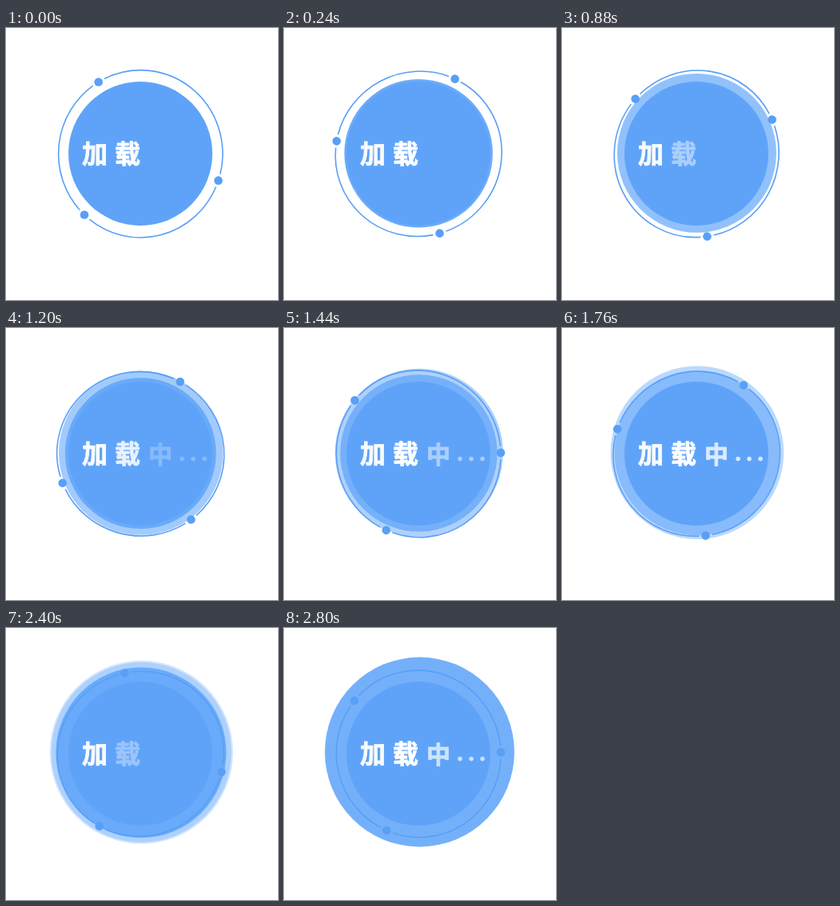
An HTML page that plays this animation: 340 by 340 pixels, repeating every 2880 ms.

```html
<!DOCTYPE html>
<html lang="zh-CN">
<head>
<meta charset="utf-8">
<title>加载中</title>
<style>
  html, body { margin: 0; width: 100%; height: 100%; overflow: hidden; background: #fff; }
  svg { display: block; width: 100vw; height: 100vh; }
  text {
    font: 900 32px "Noto Sans CJK SC", "Noto Sans CJK", sans-serif;
    text-anchor: middle;
    fill: #fff;
    stroke: #fff;
    stroke-width: .8;
    stroke-linejoin: round;
  }
</style>
</head>
<body>
<svg viewBox="0 0 340 340">
  <g id="waves" fill="#60a5fa"></g>
  <circle cx="168" cy="157" r="90" fill="#5fa3f9"/>
  <g id="orbit" fill="#599ff6"></g>
  <text x="111" y="169" opacity=".96">加</text>
  <text id="second" x="152" y="169">载</text>
  <g id="rest">
    <text x="193" y="169" style="font-size:30px">中</text>
    <text x="220 234 248" y="166" style="font-size:25px">...</text>
  </g>
</svg>
<script>
const LOOP = 2880, STEP = 80, LAST = LOOP - STEP;
const CX = 168.2, CY = 157.3, RX = 102.6, RY = 104.6;
const BASE = 90, GROWTH = 28.4;
const $ = id => document.getElementById(id);
const ramp = (t, from, span) => Math.min(1, Math.max(0, (t - from) / span));

function add(parent, tag, attrs) {
  const el = document.createElementNS("http://www.w3.org/2000/svg", tag);
  for (const k in attrs) el.setAttribute(k, attrs[k]);
  return parent.appendChild(el);
}

// The orbit is a slightly tall ellipse that turns as a whole.
function onOrbit(deg) {
  const a = deg * Math.PI / 180;
  return [CX + RX * Math.cos(a), CY + RY * Math.sin(a)];
}

const dots = [18.6, 133.2, 239.2], GAP = 4.6;
dots.forEach((deg, i) => {
  const next = i < 2 ? dots[i + 1] : dots[0] + 360;
  const [cx, cy] = onOrbit(deg);
  add($("orbit"), "circle", { cx, cy, r: 5.3 });
  add($("orbit"), "path", {
    d: `M${onOrbit(deg + GAP)} A${RX} ${RY} 0 0 1 ${onOrbit(next - GAP)}`,
    fill: "none", stroke: "#599ff6", "stroke-width": 1.6
  });
});

// Three waves start evenly apart and reach full size together.
const waves = [2000, 1300, 3000].map((fade, i) => ({
  fade, start: i * 940, el: add($("waves"), "circle", {})
}));

function drawWave({ el, start, fade }, t) {
  const age = Math.max(0, t - start);
  const grow = (age / (LAST - start)) ** .95;
  el.setAttribute("cx", 168 + 1.5 * grow);
  el.setAttribute("cy", 157 - 2 * grow);
  el.setAttribute("r", BASE + GROWTH * grow);
  el.setAttribute("opacity", age ? Math.exp(-((age / fade) ** 1.2)) : 0);
}

// Two turns per loop, lagging behind an even pace in the middle.
function turn(t) {
  const lag = Math.sin(Math.PI * ramp(t, 0, 2400) ** 1.1);
  return 720 * t / LOOP - 20.3 * Math.max(0, lag) ** 1.2;
}

// The words fade in one after another: a slow run, then a quick one.
function typing(t) {
  if (t < 480) return [1, 0];
  const [start, pace] = t < 2200 ? [480, 840] : [2260, 380];
  return [ramp(t, start, pace), .8 * ramp(t, start + .55 * pace, pace)];
}

function draw(t) {
  for (const w of waves) drawWave(w, t);
  $("orbit").setAttribute("transform", `rotate(${turn(t)} ${CX} ${CY})`);
  const [second, rest] = typing(t);
  $("second").setAttribute("opacity", second);
  $("rest").setAttribute("opacity", rest);
}

const begin = performance.now();
function tick() {
  const t = (performance.now() - begin) % LOOP;
  draw(Math.floor(t / STEP) * STEP);
  requestAnimationFrame(tick);
}
tick();
</script>
</body>
</html>
```
